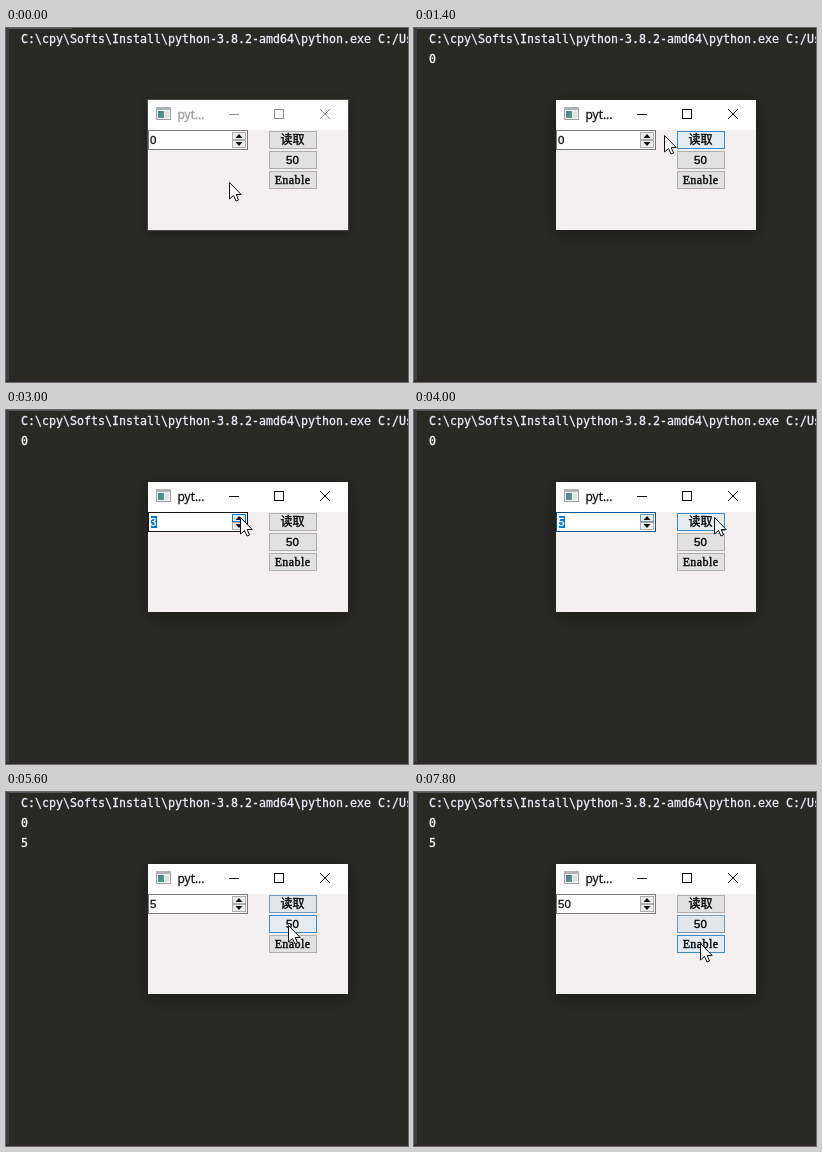
Write an HTML page with a canvas that moves like this. It is 402 px wide and 354 px high and loops after 8000 ms.

```html
<!DOCTYPE html>
<html lang="zh-CN">
<head>
<meta charset="utf-8">
<style>
html, body { margin: 0; width: 100%; height: 100%; overflow: hidden; background: #292a25; }
canvas { display: block; }
</style>
</head>
<body>
<canvas id="stage" width="402" height="354"></canvas>
<script>
const ctx = document.getElementById('stage').getContext('2d');
const LOOP = 8000, STEP = 200;
const MONO = '11.63px "DejaVu Sans Mono", monospace';
const DIGITS = '11.5px "Liberation Sans", Arial, sans-serif';
const SERIF = '12px "Liberation Serif", serif';
const CJK = '12px "Noto Sans CJK SC", "Noto Sans CJK", sans-serif';

const GREY = [173, 173, 173], BLUE = [0, 120, 215];
const home = { x: 223, y: 154 };
const moves = [
  { from: 200, to: 800, x: 282, y: 107 },
  { from: 1000, to: 1600, x: 234, y: 107 },
  { from: 3600, to: 4000, x: 300, y: 107 },
  { from: 4000, to: 4600, x: 283, y: 105 },
  { from: 4800, to: 5600, x: 282, y: 133 },
  { from: 7200, to: 7800, x: 286, y: 151 }
];

const spinBox = { x: 142, y: 102, w: 100, h: 20 };
const stepUp = { x: 226, y: 104, w: 14, h: 8 };
const stepDown = { x: 226, y: 112, w: 14, h: 8 };
const buttons = [
  { label: '读取', font: CJK, presses: [800, 4600] },
  { label: '50', font: DIGITS, presses: [6200] },
  { label: 'Enable', font: SERIF, presses: [] }
].map((button, i) => ({ ...button, x: 263, y: 103 + 20 * i, w: 48, h: 18 }));

const clamp = (v, lo, hi) => Math.max(lo, Math.min(hi, v));
const lerp = (a, b, p) => a + (b - a) * p;
const mix = (a, b, p) => `rgb(${a.map((v, i) => Math.round(lerp(v, b[i], p)))})`;

function cursorAt(t) {
  return moves.reduce((at, move) => {
    const p = clamp((t - move.from) / (move.to - move.from), 0, 1);
    return { x: lerp(at.x, move.x, p), y: lerp(at.y, move.y, p) };
  }, home);
}

function hovered(box, t) {
  const { x, y } = cursorAt(t);
  return x >= box.x && x < box.x + box.w && y >= box.y && y < box.y + box.h;
}

// Highlights fade in and out over three steps.
function glow(box, t) {
  return [0, 1, 2].filter(i => hovered(box, t - i * STEP)).length / 3;
}

function rect({ x, y, w, h }, fill, border) {
  ctx.fillStyle = fill;
  ctx.fillRect(x, y, w, h);
  if (!border) return;
  ctx.strokeStyle = border;
  ctx.lineWidth = 1;
  ctx.strokeRect(x + .5, y + .5, w - 1, h - 1);
}

const box = (x, y, w, h) => ({ x, y, w, h });

// A hairline outline gives small type the weight of hinted screen text.
function text(str, x, y, font, color, align = 'left', weight = .3) {
  ctx.font = font;
  ctx.fillStyle = ctx.strokeStyle = color;
  ctx.textAlign = align;
  ctx.lineWidth = weight;
  ctx.fillText(str, x, y);
  ctx.strokeText(str, x, y);
}

function polygon(points, fill, stroke) {
  ctx.beginPath();
  points.forEach(([x, y]) => ctx.lineTo(x, y));
  ctx.closePath();
  ctx.fillStyle = fill;
  ctx.fill();
  if (!stroke) return;
  ctx.strokeStyle = stroke;
  ctx.lineWidth = 1;
  ctx.stroke();
}

function drawConsole(t) {
  rect(box(0, 0, 402, 354), '#292a25');
  rect(box(0, 0, 66, 1), '#55565a');
  rect(box(0, 0, 3, 354), '#3c3e42');
  rect(box(0, 352, 402, 2), '#30282b');
  text('C:\\cpy\\Softs\\Install\\python-3.8.2-amd64\\python.exe C:/Users', 15, 15, MONO, '#ebebfa');
  if (t >= 1000) text('0', 15, 35, MONO, '#f8f8f4');
  if (t >= 4800) text('5', 15, 55, MONO, '#f8f8f4');
}

function drawWindow(active) {
  ctx.save();
  ctx.shadowColor = 'rgba(0,0,0,.4)';
  ctx.shadowBlur = active ? 22 : 12;
  ctx.shadowOffsetY = active ? 4 : 2;
  rect(box(142, 72, 200, 130), '#f4f0f2');
  ctx.restore();
  if (!active) {
    ctx.strokeStyle = '#484848';
    ctx.lineWidth = 1;
    ctx.strokeRect(141.5, 71.5, 201, 131);
  }
  rect(box(142, 72, 200, 30), '#ffffff');

  rect(box(150, 79, 15, 13), '#f4f6f6', '#9a9fa2');
  rect(box(150, 79, 15, 3), '#adb2b5');
  const pane = ctx.createLinearGradient(152, 82, 158, 90);
  pane.addColorStop(0, '#4a7b94');
  pane.addColorStop(1, '#5c9a84');
  rect(box(152, 83, 6, 7), pane);
  rect(box(159, 83, 4, 7), '#dfe4e4');

  const ink = active ? '#111111' : '#8c8c8c';
  text('pyt...', 171.5, 91, '12px "Open Sans", sans-serif', active ? '#111111' : '#999999');
  ctx.lineWidth = 1;
  ctx.strokeStyle = ink;
  ctx.strokeRect(268.5, 81.5, 9, 9);
  ctx.stroke(new Path2D('M223 86.5h10M314 81l10 10M324 81l-10 10'));
}

function drawSpinBox(t) {
  const value = t >= 6400 ? 50 : clamp((t - 2400) / STEP, 0, 5);
  const focused = t >= 2600 && t < 4600;
  rect(spinBox, '#ffffff', mix(focused ? BLUE : [122, 122, 122], [23, 23, 23], glow(spinBox, t)));
  if (focused) rect(box(145, 106, 6, 12), '#0078d7');
  text(value, 144, 116, DIGITS, focused ? '#ffffff' : '#111111');

  const lit = glow(stepUp, t);
  rect(stepUp, mix([238, 237, 238], [218, 235, 250], lit), mix(GREY, BLUE, lit));
  rect(stepDown, '#eeedee', '#adadad');
  polygon([[229.5, 110], [236.5, 110], [233, 106]], '#111111');
  polygon([[229.5, 114], [236.5, 114], [233, 118]], '#111111');
}

function drawButton(button, t) {
  const lit = glow(button, t);
  const pressed = button.presses.some(at => t >= at && t < at + STEP);
  rect(button,
    pressed ? '#cce4f7' : mix([225, 225, 225], [229, 241, 251], lit),
    pressed ? '#005499' : mix(GREY, BLUE, lit));
  ctx.letterSpacing = button.font === SERIF ? '0.4px' : '0px';
  text(button.label, 286.5, button.y + 13, button.font, '#0a0a0a', 'center', .4);
  ctx.letterSpacing = '0px';
}

function drawCursor(t) {
  const { x, y } = cursorAt(t);
  const arrow = [[0, 0], [0, 16.5], [4, 13], [6.5, 18.5], [9, 17.5], [6.7, 12], [11.7, 12]];
  polygon(arrow.map(([dx, dy]) => [Math.round(x) + dx + .5, Math.round(y) + dy + .5]),
    '#ffffff', '#111111');
}

function draw(t) {
  drawConsole(t);
  drawWindow(t >= 800);
  drawSpinBox(t);
  buttons.forEach(button => drawButton(button, t));
  drawCursor(t);
}

const start = performance.now();
function tick() {
  const elapsed = (performance.now() - start) % LOOP;
  draw(Math.floor(elapsed / STEP) * STEP);
  requestAnimationFrame(tick);
}
tick();
</script>
</body>
</html>
```
